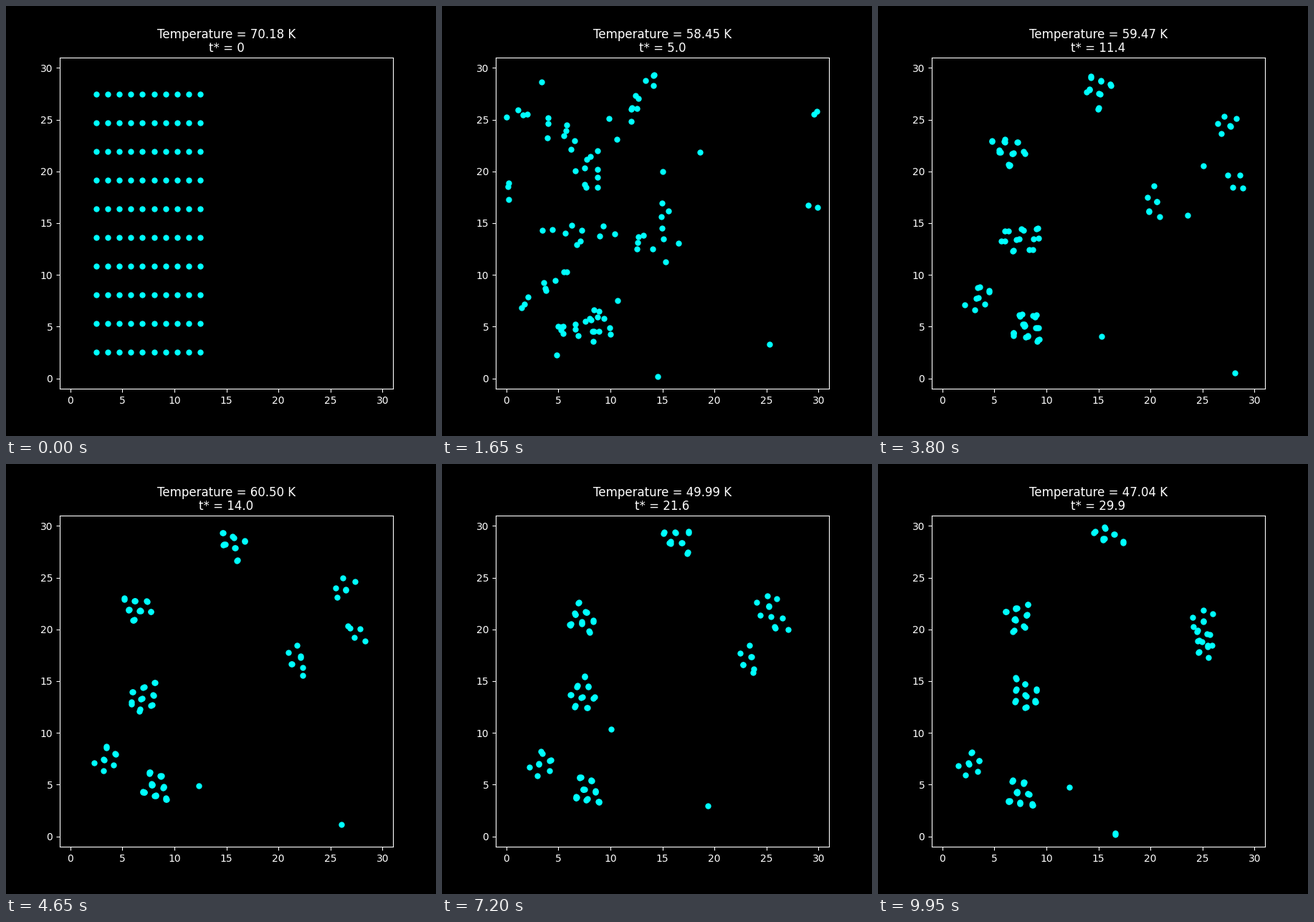
A matplotlib script that plays this animation: 600x600 px, repeating every 10 s.

```python
import numpy as np
import matplotlib.pyplot as plt
from matplotlib.animation import FuncAnimation

BOX = 30.0
BOND = 1.12
FRAMES = 200
STEP_MS = 50
MEET, SETTLED = 33, 100                  # strands formed, droplets compact
STOPS = np.array([MEET, 93, 144, 199])   # times of a droplet's waypoints

rng = np.random.default_rng(7)


def wrap(d):
    """Shortest periodic displacement, for complex points."""
    half = BOX / 2
    return ((d.real + half) % BOX - half) + 1j * ((d.imag + half) % BOX - half)


def polar(r, deg):
    return r * np.exp(1j * np.radians(deg))


def hex_site(c):
    """0 is the centre, 1-6 the first ring, a-f the second ring."""
    if c == "0":
        return 0j
    if c.isdigit():
        return polar(BOND, 60 * (int(c) - 1))
    return polar(BOND * 3 ** 0.5, 30 + 60 * "abcdef".index(c))


def match(a, b):
    """Order b so that each point of a has a short way, by pair swaps."""
    cost = abs(wrap(b[None] - a[:, None])) ** 2
    order = np.arange(len(a))
    changed = True
    while changed:
        changed = False
        for i in range(len(a)):
            for j in range(i):
                p, q = order[i], order[j]
                if cost[i, q] + cost[j, p] < cost[i, p] + cost[j, q] - 1e-9:
                    order[i], order[j] = q, p
                    changed = True
    return b[order]


class Droplet:
    """A loose strand of n atoms that contracts to a drifting hexagonal patch."""

    def __init__(self, n, path, sites="0", turn=(0, 0), reach=0, noise=0):
        self.path = np.array(path, complex)
        self.slope = np.gradient(self.path, STOPS)
        self.turn = turn
        self.strand = (reach * np.linspace(-1, 1, n)
                       + noise * (rng.normal(size=n) + 1j * rng.normal(size=n)))
        cells = np.array([hex_site(c) for c in sites])
        spin = polar(1, self.angle(STOPS[1]))
        self.cells = match(self.strand, cells[np.arange(n) % len(cells)] * spin) / spin

    def angle(self, k):
        a, b = self.turn
        return a + (b - a) * (k - STOPS[2]) / (STOPS[3] - STOPS[2])

    def centre(self, k):
        i = min(np.searchsorted(STOPS, k, side="right") - 1, len(STOPS) - 2)
        h = STOPS[i + 1] - STOPS[i]
        u = (k - STOPS[i]) / h
        return ((1 + 2 * u) * (1 - u) ** 2 * self.path[i]
                + u * (1 - u) ** 2 * h * self.slope[i]
                + u * u * (3 - 2 * u) * self.path[i + 1]
                - u * u * (1 - u) * h * self.slope[i + 1])

    def atoms(self, k):
        loose = max(0, 1 - (k - MEET) / (SETTLED - MEET)) ** 2
        patch = self.cells * polar(1, self.angle(k))
        return self.centre(k) + loose * self.strand + (1 - loose) * patch


DROPLETS = [
    Droplet(23, [8.1 + 5.4j, 7.9 + 5.05j, 7.45 + 4.6j, 7.15 + 4.3j],
            "012345b", (227, 231), reach=3.2 + 0.6j, noise=1.1),
    Droplet(9, [3.5 + 8.7j, 3.3 + 7.5j, 3.2 + 7.0j, 2.55 + 7.05j],
            "012456", (20, 15), reach=2.3 + 2.1j, noise=0.4),
    Droplet(16, [9.5 + 13.6j, 6.9 + 13.3j, 7.3 + 13.5j, 8.0 + 13.6j],
            "0123456b", (-5, 30), reach=5.5 - 1.2j, noise=1.0),
    Droplet(18, [7.0 + 22.0j, 6.7 + 21.8j, 7.3 + 20.65j, 7.0 + 20.95j],
            "012356a", (70, 22), reach=1.8 - 3.2j, noise=0.9),
    Droplet(13, [12.7 + 27.2j, 14.8 + 28.2j, 15.75 + 28.4j, 15.5 + 28.7j],
            "0123af", (0, 22), reach=2.2 + 3.4j, noise=0.6),
    Droplet(6, [30.7 + 25.7j, 26.5 + 23.8j, 25.2 + 22.2j, 25.1 + 20.8j],
            "01234", (40, 35), reach=1.4 - 0.2j, noise=0.3),
    Droplet(4, [30.25 + 17.8j, 27.9 + 20.0j, 26.6 + 21.0j, 25.6 + 19.6j],
            "0456", (-10, -10), reach=0.1 + 1.1j, noise=0.2),
    Droplet(7, [15.2 + 15.3j, 21.3 + 16.6j, 22.7 + 16.6j, 24.65 + 17.75j],
            "0126a", (40, 35), reach=4j, noise=0.7),
    # single atoms
    Droplet(1, [25.35 + 3.35j, 12.35 + 4.9j, 10 + 10.4j, 9 + 13.05j]),
    Droplet(1, [33.45 + 28.6j, 26 + 31.1j, 19.45 + 32.9j, 12.25 + 34.8j]),
    Droplet(1, [29 + 16.8j, 22.3 + 15.5j, 23.75 + 15.85j, 24.6 + 18.9j]),
    Droplet(1, [18.65 + 21.85j, 26.7 + 20.3j, 25.8 + 20.2j, 24.6 + 19.85j]),
]


def gather(k):
    return np.concatenate([d.atoms(k) for d in DROPLETS])


FIRST = gather(MEET)
COLS, ROWS = np.meshgrid(np.linspace(2.5, 12.5, 10), np.linspace(2.5, 27.5, 10))
GRID = match(FIRST, (COLS + 1j * ROWS).ravel())
FLIGHT = wrap(FIRST - GRID)
PHASE = rng.uniform(0, 2 * np.pi, (2, len(GRID)))
RATE = rng.uniform(0.4, 0.8, (2, len(GRID)))


def positions(k):
    p = GRID + FLIGHT * k / MEET if k < MEET else gather(k)
    shake = 0.08 * min(1, k / MEET) * np.sin(RATE * k + PHASE)
    return (np.array([p.real, p.imag]) + shake) % BOX


def heading(k):
    marks = [0, 33, 60, 93, 144, 165, 199]
    levels = [70.18, 58.45, 62.87, 60.50, 49.99, 56.69, 47.04]
    ripple = np.sin(np.pi * np.interp(k, marks, range(len(marks))))
    swing = np.sin(0.9 * k) + 0.8 * np.sin(0.37 * k + 1)
    kelvin = np.interp(k, marks, levels) + 1.8 * ripple * swing
    clock = f"{int(k * 1.5 + 0.5) / 10:.1f}" if k else "0"
    return f"Temperature = {kelvin:.2f} K\nt* = {clock}"


plt.style.use("dark_background")
plt.rcParams["font.family"] = "DejaVu Sans"
fig, ax = plt.subplots(figsize=(6, 6), dpi=100, facecolor="black")
fig.subplots_adjust(left=0.125, right=0.9, bottom=0.11, top=0.88)
ax.set(xlim=(-1, 31), ylim=(-1, 31), facecolor="black")
ax.set_xticks(range(0, 31, 5))
ax.set_yticks(range(0, 31, 5))
dots, = ax.plot([], [], "o", color="cyan", ms=5)
title = ax.set_title(heading(0), pad=5.4, linespacing=1.1)


def update(k):
    dots.set_data(*positions(k))
    title.set_text(heading(k))
    return dots, title


anim = FuncAnimation(fig, update, frames=FRAMES, interval=STEP_MS,
                     repeat=True, repeat_delay=0)
plt.show()
```
